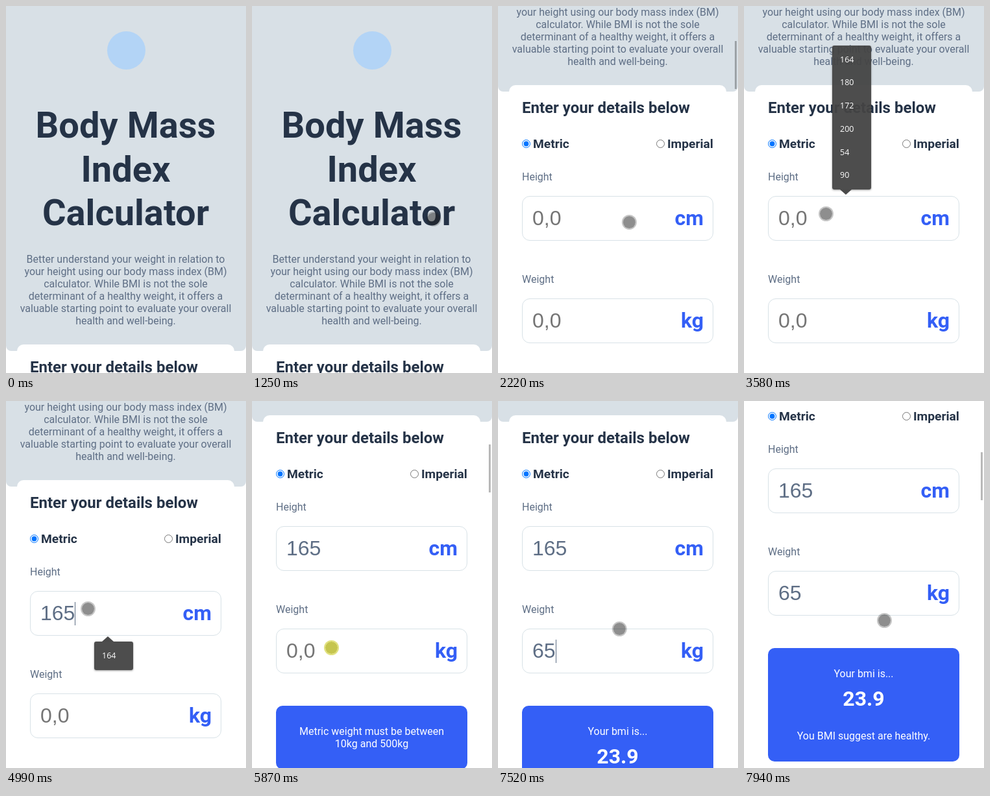
An HTML page for the animation above (8 s loop, 370 by 566 pixels).

```html
<!DOCTYPE html>
<html lang="en">
<head>
<meta charset="utf-8">
<title>Body Mass Index Calculator</title>
<style>
* { box-sizing: border-box; }
html, body { margin: 0; width: 100%; height: 100%; overflow: hidden; background: #fff; }
body { position: relative; font: 16px/19px Roboto, sans-serif; color: #5e6e85; cursor: default; }
#page, #page > *, .unit, .caret, .bar, .cursor, .popup, .tip { position: absolute; }
#page { left: 0; top: 0; width: 370px; height: 1200px; will-change: transform; }
.hero { left: 0; top: 0; width: 370px; height: 532px; background: #d8e0e6; border-radius: 0 0 8px 8px; }
.logo { left: 155.5px; top: 38.5px; width: 59px; height: 59px; border-radius: 50%; background: #b3d4f6; }
h1, .intro { left: 0; width: 369px; margin: 0; text-align: center; white-space: pre; }
h1 { top: 151.4px; font: bold 56px/67.2px Roboto, sans-serif; color: #253347; }
.intro { top: 381px; }
.card { left: 17px; top: 522px; width: 335px; height: 678px; background: #fff; border-radius: 10px; }
h2 { left: 37px; top: 543px; margin: 0; font: bold 24px/28px Roboto, sans-serif; color: #253347; white-space: nowrap; }
.choice { top: 601px; font: bold 19.2px/23px Roboto, sans-serif; color: #253347; white-space: nowrap; }
.choice input { position: absolute; top: 5px; left: -17px; width: 13px; height: 13px; margin: 0; pointer-events: none; }
.label { left: 37px; }
.field { left: 37px; width: 295px; height: 69px; border: 1px solid #d8e2e7; border-radius: 12px;
  padding-left: 15px; font: 32px/67px "Liberation Sans", Arial, sans-serif; }
.empty { color: #757575; }
.unit { right: 14px; top: 0; font: bold 32px/67px Roboto, sans-serif; color: #345ff6; }
.caret { top: 16px; width: 1px; height: 36px; background: #5e6e85; }
.result { left: 37px; top: 970px; width: 295px; padding: 30px 0; border-radius: 10px;
  background: #345ff6; color: #fff; text-align: center; white-space: pre; }
.result b { display: block; margin: 10px 0 29px; font-size: 32px; line-height: 38px; }
.bar { left: 365px; width: 3px; height: 74px; background: rgba(0, 0, 0, .28); }
.popup { left: 136px; padding: 4px 12px; border-radius: 3px; background: rgba(68, 68, 68, .95);
  box-shadow: 0 1px 3px rgba(0, 0, 0, .4); font: 12.5px/35.7px "Open Sans", sans-serif; color: #fff; }
.tip { left: 12px; border: 9px solid transparent; border-width: 0 9px; }
.above .tip { top: 100%; border-top: 8.5px solid #4a4a4a; }
.below .tip { bottom: 100%; border-bottom: 8.5px solid #4a4a4a; }
.cursor { left: -11.5px; top: -11.5px; width: 23px; height: 23px; border-radius: 50%;
  border: 2px solid rgba(30, 30, 30, .25); background: rgba(30, 30, 30, .5) padding-box; }
.cursor.down { border-color: rgba(205, 205, 40, .6); background-color: rgba(175, 175, 10, .72); }
</style>
</head>
<body>
<div id="page">
  <div class="hero"></div>
  <div class="logo"></div>
  <h1>Body Mass
Index
Calculator</h1>
  <p class="intro">Better understand your weight in relation to
your height using our body mass index (BM)
calculator. While BMI is not the sole
determinant of a healthy weight, it offers a
valuable starting point to evaluate your overall
health and well-being.</p>
  <div class="card"></div>
  <h2>Enter your details below</h2>
  <label class="choice" style="left:54px"><input type="radio" name="system" checked>Metric</label>
  <label class="choice" style="left:261px"><input type="radio" name="system">Imperial</label>
  <div class="label" style="top:654px">Height</div>
  <div class="field" style="top:693px"><span></span><i class="caret"></i><div class="unit">cm</div></div>
  <div class="label" style="top:812px">Weight</div>
  <div class="field" style="top:851px"><span></span><i class="caret"></i><div class="unit">kg</div></div>
  <div class="result"></div>
</div>
<div class="bar"></div>
<div class="popup"></div>
<div class="cursor"></div>
<script>
const LOOP = 8000;
const $ = s => document.querySelector(s);
const page = $('#page'), bar = $('.bar'), popup = $('.popup'), cursor = $('.cursor'), result = $('.result');
const fields = [...document.querySelectorAll('.field')].map(el => ({
  el, text: el.querySelector('span'), caret: el.querySelector('.caret')
}));

// [time, x, y, eased]
const path = [
  [165, 340.5, 453.5], [580, 280.5, 322.5, 1], [720, 280.5, 322.5], [780, 281.5, 323],
  [1120, 281.5, 323], [1720, 272, 345], [2220, 202, 333], [2750, 134, 319.5],
  [3090, 134, 319.5], [3230, 126, 320], [5000, 126, 320], [5740, 122, 380, 1],
  [7150, 122, 380], [7740, 216, 338, 1]
];
// [start, end, from, to]
const scrolls = [[1478, 2160, 0, 400], [5230, 5540, 400, 500], [7740, 7994, 500, 600]];
const presses = [[2820, 3090], [5800, 5940]];
const typing = [
  [[3790, '1'], [4720, '16'], [4990, '165']],
  [[6960, '6'], [7240, '65']]
];
// [start, end] per field
const carets = [
  [[3090, 3580], [3790, 4250], [4720, 5490]],
  [[5940, 6480], [6960, 7740]]
];
const heights = ['164', '180', '172', '200', '54', '90'];
const weights = ['10', '100', '500', '222', 'sssdd', '10000'];
// [start, end, side, edge, width, entries]
const popups = [
  [3160, 3790, 'above', 283, 60, heights],
  [3790, 4720, 'below', 371, 60, heights.filter(h => h[0] === '1')],
  [4720, 5060, 'below', 371, 60, ['164']],
  [5940, 7100, 'above', 341, 72, weights]
];

const smooth = p => p * p * (3 - 2 * p);
const clamp = p => Math.max(0, Math.min(1, p));
const within = (t, spans) => spans.find(s => t >= s[0] && t < s[1]);

function pointAt(t) {
  const i = path.findIndex(p => p[0] > t);
  if (i < 0) return path[path.length - 1].slice(1, 3);
  if (i === 0) return path[0].slice(1, 3);
  const a = path[i - 1], b = path[i];
  let p = (t - a[0]) / (b[0] - a[0]);
  if (b[3]) p = smooth(p);
  return [a[1] + (b[1] - a[1]) * p, a[2] + (b[2] - a[2]) * p];
}

function scrollAt(t) {
  return scrolls.reduce((y, [start, end, from, to]) =>
    t < start ? y : from + (to - from) * smooth(clamp((t - start) / (end - start))), 0);
}

function barAt(t) {
  return scrolls.reduce((o, [start, end]) => t < start ? o : 1 - clamp((t - end - 330) / 200), 0);
}

function setHTML(el, html) {
  if (el.shown !== html) el.innerHTML = el.shown = html;
}

function drawField(f, i, t) {
  const value = typing[i].reduce((v, [at, s]) => t >= at ? s : v, '');
  setHTML(f.text, value || '0,0');
  f.text.className = value ? '' : 'empty';
  f.caret.style.left = 15 + Math.round(value.length * 17.8) + 'px';
  f.caret.style.visibility = within(t, carets[i]) ? 'visible' : 'hidden';
  return Number(value);
}

function drawPopup(t) {
  const now = within(t, popups);
  popup.style.display = now ? 'block' : 'none';
  if (!now) return;
  const [, , side, edge, width, entries] = now;
  popup.className = 'popup ' + side;
  popup.style.width = width + 'px';
  popup.style.top = side === 'below' ? edge + 'px' : 'auto';
  popup.style.bottom = side === 'above' ? `calc(100% - ${edge}px)` : 'auto';
  setHTML(popup, entries.map(e => `<div>${e}</div>`).join('') + '<i class="tip"></i>');
}

function draw(t) {
  const y = Math.round(scrollAt(t));
  page.style.transform = `translateY(${-y}px)`;
  bar.style.top = Math.round(1.8 + y * .1307) + 'px';
  bar.style.opacity = barAt(t);

  const [cm, kg] = fields.map((f, i) => drawField(f, i, t));
  setHTML(result, kg >= 10
    ? `Your bmi is...<b>${(kg / (cm / 100) ** 2).toFixed(1)}</b>You BMI suggest are healthy.`
    : 'Metric weight must be between\n10kg and 500kg');
  drawPopup(t);

  const [cx, cy] = pointAt(t);
  cursor.style.transform = `translate(${cx}px, ${cy}px)`;
  cursor.style.opacity = t < 70 ? 0 : 1;
  cursor.classList.toggle('down', !!within(t, presses));
}

const start = performance.now();
function tick() {
  draw((performance.now() - start) % LOOP);
  requestAnimationFrame(tick);
}
tick();
</script>
</body>
</html>
```
